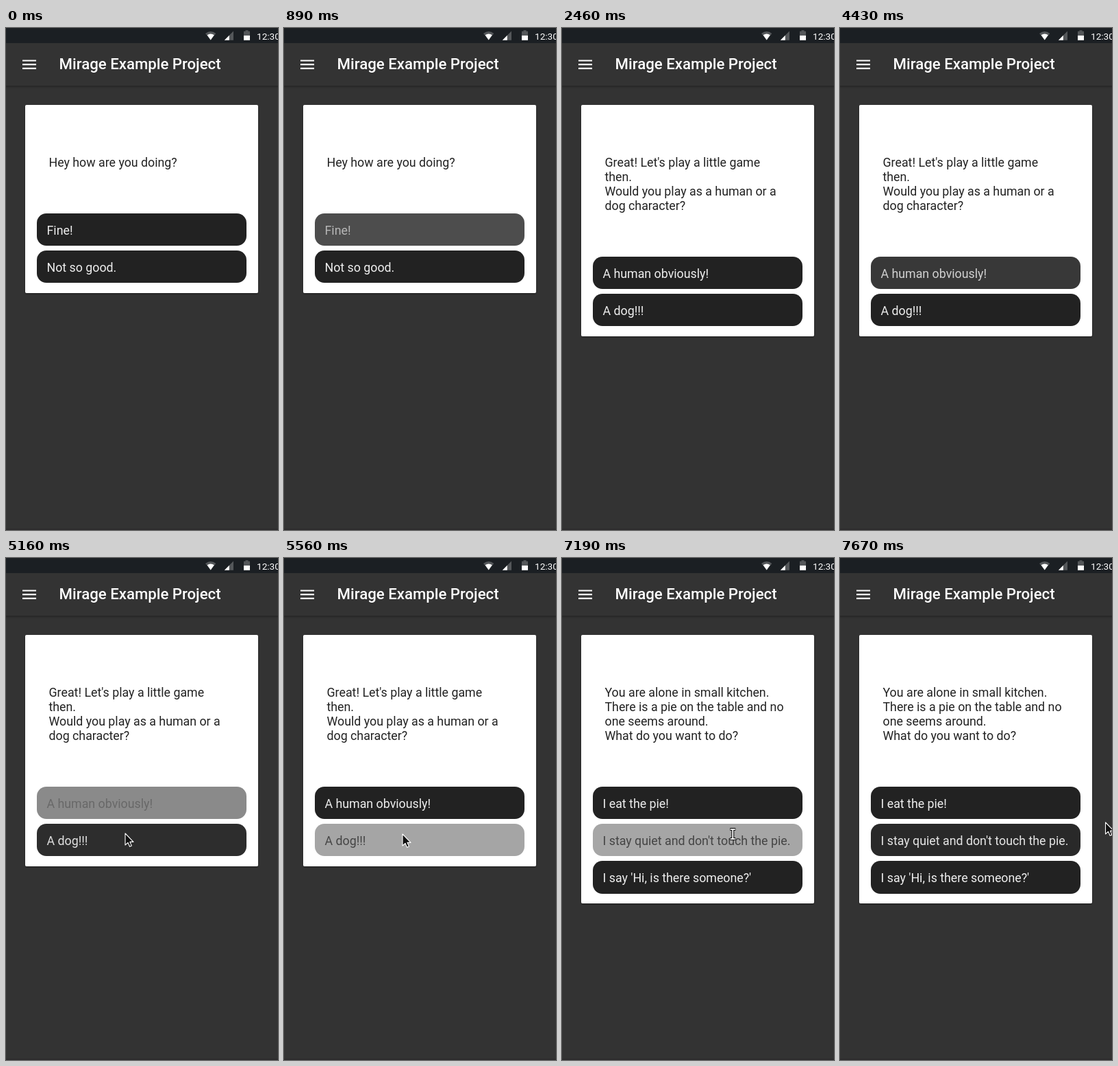
Recreate the animation shown at these times as an HTML page. Size 397x731 px, loop 8000 ms.

```html
<!DOCTYPE html>
<html lang="en">
<head>
<meta charset="utf-8">
<title>Dialogue cards</title>
<style>
  html, body { margin: 0; width: 100%; height: 100%; overflow: hidden; background: #333; }
  svg { display: block; width: 100%; height: 100%; }
  text { font-family: Roboto, sans-serif; font-size: 17.8px; white-space: pre; }
</style>
</head>
<body>
<svg viewBox="0 0 397 731" xmlns="http://www.w3.org/2000/svg">
  <defs>
    <linearGradient id="barShade" x2="0" y2="1">
      <stop offset="0" stop-color="#000" stop-opacity=".28"/>
      <stop offset="1" stop-color="#000" stop-opacity="0"/>
    </linearGradient>
    <filter id="lift" x="-5%" y="-5%" width="110%" height="110%">
      <feDropShadow dx="0" dy="1.2" stdDeviation="1.2" flood-color="#000" flood-opacity=".4"/>
    </filter>
  </defs>

  <rect width="397" height="731" fill="#333"/>
  <rect y="729" width="397" height="2" fill="#2d2c2d"/>

  <!-- status bar -->
  <rect width="397" height="22" fill="#1b1f23"/>
  <path d="M291 8Q298.700 2 306.400 8L298.700 17.500Z" fill="#54575a"/>
  <path d="M293.600 10.200Q298.700 6.600 303.800 10.200L298.700 17.500Z" fill="#fff"/>
  <path d="M318.800 17.800L332 4.600V17.800Z" fill="#54575a"/>
  <path d="M318.800 17.800L325.800 10.800V17.800Z" fill="#fff"/>
  <path d="M347 4.800H349.500V3.300H353.500V4.800H356V11H347Z" fill="#54575a"/>
  <rect x="347" y="11" width="9" height="6.800" fill="#fff"/>
  <text x="366" y="16.500" fill="#fff" style="font-size:13.600px">12:30</text>

  <!-- app bar -->
  <rect y="84" width="397" height="4" fill="url(#barShade)"/>
  <path d="M24 47.500H44M24 53.200H44M24 58.900H44" stroke="#fff" stroke-width="2.200"/>
  <text x="77.600" y="60" fill="#fff" style="font-size:22.200px;font-weight:500">Mirage Example Project</text>

  <rect id="card" x="28" y="112" width="340" rx="2" fill="#fff" filter="url(#lift)"/>
  <g id="prompt" fill="#222"></g>
  <g id="buttons"></g>

  <g id="ring">
    <circle r="7.500" fill="#1736c8"/>
    <path d="M-6 -2A6.500 6.500 0 0 0 -2 6M4 -5V5" fill="none" stroke="#16c9e8" stroke-width="2.500"/>
  </g>
  <path id="arrow" d="M0 0V17L4 13.400L6.600 19.300L9.400 18.100L6.900 12.400H12Z"
        fill="#111" stroke="#fff" stroke-width="1.100" stroke-linejoin="round"/>
  <g id="beam" fill="none">
    <path d="M-4 -7H4M-4 7H4M0 -7V7" stroke="#111" stroke-width="4"/>
    <path d="M-3.500 -7H3.500M-3.500 7H3.500M0 -7V7" stroke="#fff" stroke-width="1.800"/>
  </g>
</svg>
<script>
const LOOP = 8000, FADE = 500;
const NS = 'http://www.w3.org/2000/svg';
const $ = id => document.getElementById(id);

const cards = [
  { at: 0, bottom: 386, top: 270,
    lines: ['Hey how are you doing?'],
    answers: ['Fine!', 'Not so good.'] },
  { at: 2180, bottom: 449, top: 333,
    lines: ["Great! Let's play a little game", 'then.', 'Would you play as a human or a', 'dog character?'],
    answers: ['A human obviously!', 'A dog!!!'] },
  { at: 6590, bottom: 503, top: 333,
    lines: ['You are alone in small kitchen.', 'There is a pie on the table and no', 'one seems around.', 'What do you want to do?'],
    answers: ['I eat the pie!', "I stay quiet and don't touch the pie.", "I say 'Hi, is there someone?'"] }
];

// show: first moment the fade becomes visible
const hovers = [
  { card: 0, button: 0, enter: 785, show: 810, leave: Infinity },
  { card: 1, button: 0, enter: 4360, show: 4430, leave: 5080 },
  { card: 1, button: 1, enter: 5115, show: 5120, leave: Infinity },
  { card: 2, button: 1, enter: 6600, show: 6600, leave: 7310 }
];

// time, x, y of the pointer tip
const path = [
  [5100, 174, 390], [5160, 174, 401], [5300, 173, 402], [7100, 173, 402],
  [7310, 349, 386], [7430, 362, 348], [7670, 387.5, 385]
];

const clamp = v => Math.min(1, Math.max(0, v));

// cubic-bezier(.25, .1, .25, 1)
function ease(x) {
  if (x <= 0 || x >= 1) return clamp(x);
  const curve = (a, b, s) => 3 * a * s * (1 - s) ** 2 + 3 * b * s * s * (1 - s) + s ** 3;
  let lo = 0, hi = 1;
  for (let i = 0; i < 20; i++) {
    const mid = (lo + hi) / 2;
    if (curve(.25, .25, mid) < x) lo = mid; else hi = mid;
  }
  return curve(.1, 1, lo);
}

function add(parent, tag, attrs, label = '') {
  const el = document.createElementNS(NS, tag);
  for (const key in attrs) el.setAttribute(key, attrs[key]);
  el.textContent = label;
  return parent.appendChild(el);
}

const grey = v => `rgb(${Array(3).fill(Math.round(v)).join()})`;

let shown = -1, parts = [];

function showCard(index) {
  if (index === shown) return;
  shown = index;
  const { lines, answers, top, bottom } = cards[index];
  $('card').setAttribute('height', bottom - 112);
  $('prompt').replaceChildren();
  $('buttons').replaceChildren();
  lines.forEach((line, i) => add($('prompt'), 'text', { x: 62.5, y: 202 + 21 * i }, line));
  parts = answers.map((answer, i) => {
    const y = top + 54 * i;
    return {
      box: add($('buttons'), 'rect', { x: 45, y, width: 306, height: i === 2 ? 48 : 47, rx: 14 }),
      label: add($('buttons'), 'text', { x: 59.5, y: y + 31 }, answer)
    };
  });
}

function hoverLevel(button, t) {
  const h = hovers.find(h => h.card === shown && h.button === button);
  if (!h || t < h.show) return 0;
  return ease((t - h.enter) / FADE) * (1 - ease((t - h.leave) / FADE));
}

function pointerAt(t) {
  let i = 0;
  while (i < path.length - 2 && t > path[i + 1][0]) i++;
  const [a, b] = [path[i], path[i + 1]];
  const k = clamp((t - a[0]) / (b[0] - a[0]));
  return [a[1] + (b[1] - a[1]) * k, a[2] + (b[2] - a[2]) * k];
}

function place(id, visible, x, y) {
  $(id).style.display = visible ? '' : 'none';
  $(id).setAttribute('transform', `translate(${x} ${y})`);
}

function draw(t) {
  showCard(cards.findLastIndex(c => t >= c.at));
  parts.forEach(({ box, label }, i) => {
    const level = hoverLevel(i, t);
    box.setAttribute('fill', grey(34 + 132 * level));
    label.setAttribute('fill', grey(238 - 170 * level));
  });

  const [x, y] = pointerAt(t);
  const overText = t >= 6590 && x < 333;
  place('arrow', t >= path[0][0] && !overText, x, y);
  place('beam', overText, x, y + 7);
  place('ring', t >= 6590 && t < 6870, 173, 409);
  $('ring').setAttribute('opacity', 1 - clamp((t - 6640) / 230));
}

const start = performance.now();
function tick() {
  draw((performance.now() - start) % LOOP);
  requestAnimationFrame(tick);
}
tick();
</script>
</body>
</html>
```
